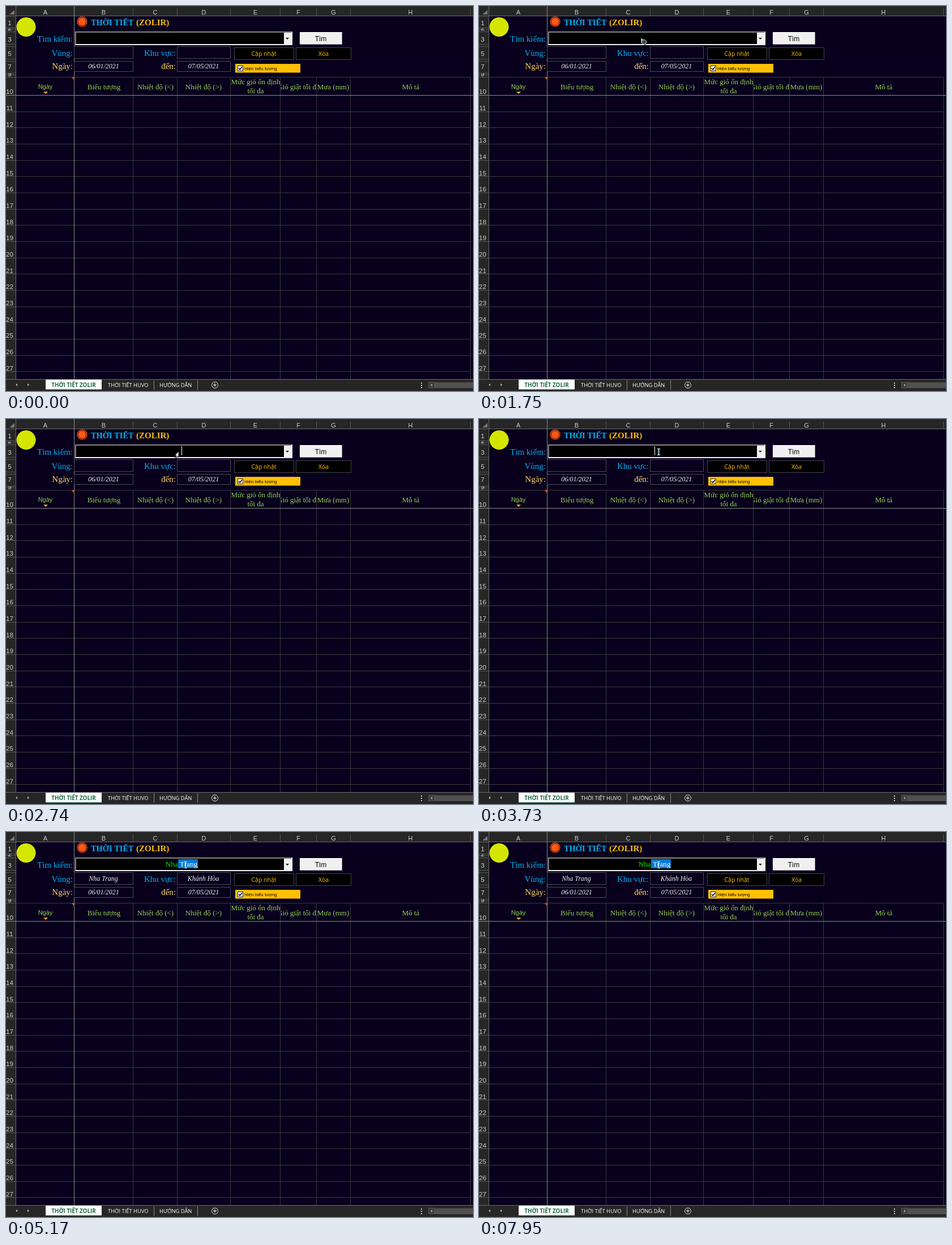
Animation, 825 px wide and 679 px high, one loop 8 s. Source, as an HTML page with a canvas:

```html
<!DOCTYPE html>
<html lang="vi">
<head>
<meta charset="utf-8">
<style>
html, body { margin: 0; width: 100%; height: 100%; overflow: hidden; background: #08001c; }
canvas { display: block; }
</style>
</head>
<body>
<canvas id="stage" width="825" height="679"></canvas>
<script>
const ctx = document.getElementById('stage').getContext('2d');
const LOOP = 8000;
const SERIF = '"Liberation Serif", serif';
const SANS = '"Liberation Sans", sans-serif';
const UI = '"Open Sans", "Noto Sans", sans-serif';
const BLUE = '#00b0f0', GOLD = '#ffc000', PALE = '#ffd966', GREEN = '#92d050';
const BG = '#08001c', CHROME = '#262626', GRID = '#3a3940', FREEZE = '#8c8c8c';
const columns = [18, 120, 224, 302, 396, 484, 548, 608, 820];
const rowPitch = 86 / 3;

function rect(x, y, w, h, color) {
  ctx.fillStyle = color;
  ctx.fillRect(x, y, w, h);
}
function box(x, y, w, h, fill, border) {
  rect(x, y, w, h, border);
  rect(x + 1, y + 1, w - 2, h - 2, fill);
}
// One bevel ring: light or dark on the top left, the other on the bottom right.
function bevel(x, y, w, h, topLeft, bottomRight) {
  rect(x, y, w, 1, topLeft);
  rect(x, y, 1, h, topLeft);
  rect(x, y + h - 1, w, 1, bottomRight);
  rect(x + w - 1, y, 1, h, bottomRight);
}
function text(str, x, y, font, color, align = 'center') {
  ctx.font = font;
  ctx.fillStyle = color;
  ctx.textAlign = align;
  ctx.fillText(str, x, y);
}
function clipped(x, y, w, h, draw) {
  ctx.save();
  ctx.beginPath();
  ctx.rect(x, y, w, h);
  ctx.clip();
  draw();
  ctx.restore();
}
function shape(points, fill, stroke) {
  ctx.beginPath();
  points.forEach(([x, y]) => ctx.lineTo(x, y));
  ctx.closePath();
  ctx.fillStyle = fill;
  ctx.fill();
  if (stroke) {
    ctx.strokeStyle = stroke;
    ctx.lineWidth = 1;
    ctx.stroke();
  }
}
function circle(x, y, r, fill, stroke, width = 1) {
  ctx.beginPath();
  ctx.arc(x, y, r, 0, Math.PI * 2);
  if (fill) { ctx.fillStyle = fill; ctx.fill(); }
  if (stroke) { ctx.strokeStyle = stroke; ctx.lineWidth = width; ctx.stroke(); }
}

function drawGrid() {
  rect(0, 0, 825, 679, BG);
  rect(0, 0, 825, 18, CHROME);
  rect(0, 0, 17, 658, CHROME);
  rect(18, 125, 802, 1, GRID);
  columns.slice(1).forEach(x => {
    rect(x, 4, 1, 14, '#555');
    rect(x, 125, 1, 533, GRID);
  });
  [38, 41, 45, 67, 71, 93, 97, 118, 121, 125].forEach(y => rect(0, y, 17, 1, '#555'));
  for (let i = 1; i < 18; i++) {
    const y = Math.round(157 + i * rowPitch);
    rect(18, y, 802, 1, GRID);
    rect(0, y, 17, 1, '#555');
  }
  rect(0, 17, 825, 1, '#6a6a6a');
  rect(17, 0, 1, 658, '#6a6a6a');
  rect(0, 157, 825, 1, FREEZE);
  rect(120, 0, 1, 658, FREEZE);

  shape([[15, 7], [15, 15], [6, 15]], '#777');
  [...'ABCDEFGH'].forEach((letter, i) =>
    text(letter, (columns[i] + columns[i + 1]) / 2 + 0.5, 15, '11px ' + SANS, '#d0d0d0'));
  const label = (n, y) => text(n, 6.5, y, '11.5px ' + SANS, '#d0d0d0');
  [[1, 34], [3, 63], [5, 88], [7, 111], [10, 155]].forEach(([n, y]) => label(n, y));
  clipped(0, 39, 17, 6, () => label(2, 43));
  clipped(0, 119, 17, 6, () => label(9, 124));
  for (let n = 11; n < 28; n++) label(n, Math.round(184 + (n - 11) * rowPitch));
}

function drawSun(x, y) {
  const rays = Array.from({ length: 32 }, (_, i) => {
    const a = i * Math.PI / 16, r = i % 2 ? 8 : 10;
    return [x + r * Math.cos(a), y + r * Math.sin(a)];
  });
  shape(rays, '#f04a12');
  circle(x, y, 7, '#ff5a14', '#5a1a10');
}

function drawForm() {
  circle(35.5, 37, 17, '#d4e600');
  drawSun(134.5, 27.5);
  text('THỜI TIẾT', 150, 34, 'bold 14.4px ' + SERIF, BLUE, 'left');
  text('(ZOLIR)', 230, 34, 'bold 15px ' + SERIF, GOLD, 'left');
  [['Tìm kiếm:', 118, 63, BLUE], ['Vùng:', 118, 88, BLUE], ['Khu vực:', 300, 88, BLUE],
   ['Ngày:', 118, 111, PALE], ['đến:', 300, 111, PALE]]
    .forEach(([s, x, y, color]) => text(s, x, y, '15px ' + SERIF, color, 'right'));

  [[120, 105], [302, 95]].forEach(([x, w]) => {
    box(x, 71, w, 22, BG, '#4b4a52');
    box(x, 97, w, 19, BG, '#4b4a52');
  });
  text('06/01/2021', 172.5, 110, 'italic 12px ' + SERIF, '#f2f2f2');
  text('07/05/2021', 349, 110, 'italic 12px ' + SERIF, '#f2f2f2');

  rect(122, 45, 384, 24, '#000');
  bevel(122, 45, 384, 24, '#a0a0a0', '#fff');
  bevel(123, 46, 382, 22, '#696969', '#e3e3e3');
  rect(491, 47, 13, 20, '#f0f0f0');
  shape([[494, 56], [500, 56], [497, 59]], '#000');

  rect(519, 46, 75, 22, '#f0f0f0');
  bevel(519, 46, 75, 22, '#fff', '#a0a0a0');
  text('Tìm', 556, 62, '12px ' + SANS, '#000');

  box(403, 73, 106, 22, '#000', '#44434a');
  box(512, 73, 98, 22, '#000', '#44434a');
  text('Cập nhật', 455.5, 88, '10.5px ' + UI, GOLD);
  text('Xóa', 561, 88, '10.5px ' + UI, GOLD);
  rect(405, 102, 115, 15.5, GOLD);
  box(409, 105, 10, 10, '#fff', '#222');
  ctx.beginPath();
  ctx.moveTo(411, 110);
  ctx.lineTo(413, 112);
  ctx.lineTo(417, 107.5);
  ctx.strokeStyle = '#000';
  ctx.lineWidth = 1.6;
  ctx.stroke();
  text('Hiện biểu tượng', 421, 113, '8px ' + SANS, '#000', 'left');
}

function drawTableHeader() {
  const font = '13px ' + SERIF;
  text('Ngày', 69.5, 146, '11px ' + SANS, GREEN);
  shape([[66, 151], [74, 151], [70, 155]], '#ffa51f');
  shape([[115.5, 125.5], [120.5, 125.5], [120.5, 130.5]], '#e2571e');
  [['Biểu tượng', 173, 147], ['Nhiệt độ (<)', 264, 147], ['Nhiệt độ (>)', 349, 147],
   ['Mức gió ổn định', 441, 138], ['tối đa', 441, 154], ['Mưa (mm)', 578, 147], ['Mô tả', 715, 147]]
    .forEach(([s, x, y]) => text(s, x, y, font, GREEN));
  clipped(485, 126, 63, 31, () => text('Gió giật tối đa', 516.5, 147, font, GREEN));
}

function drawTabs() {
  rect(0, 658, 825, 21, CHROME);
  rect(0, 658, 825, 1, '#6a6a6a');
  shape([[20, 665.5], [20, 670.5], [17, 668]], '#b5b5b5');
  shape([[38, 665.5], [38, 670.5], [41, 668]], '#b5b5b5');
  rect(70, 659, 99, 17, '#fff');
  rect(70, 676, 99, 1, '#217346');
  text('THỜI TIẾT ZOLIR', 119.5, 672, 'bold 9.8px ' + UI, '#1c6a43');
  text('THỜI TIẾT HUVO', 180, 672, '9.4px ' + UI, '#fff', 'left');
  text('HƯỚNG DẪN', 271, 672, '9.4px ' + UI, '#fff', 'left');
  [261, 338].forEach(x => rect(x, 660, 1, 17, '#8a8a8a'));
  circle(369, 668.5, 5.5, null, '#ddd');
  rect(366, 668, 6, 1, '#fff');
  rect(368.5, 665.5, 1, 6, '#fff');
  [664, 668, 672].forEach(y => rect(733, y, 2, 2, '#c8c8c8'));
  rect(746, 663, 79, 11, '#333');
  box(746, 663, 11, 11, '#3c3c3c', '#555');
  shape([[753, 666], [753, 671], [750, 668.5]], '#aaa');
  rect(757, 664, 68, 10, '#505050');
}

function drawEntry(t) {
  if (t < 4080) {
    if ((t >= 2630 && t < 3160) || t >= 3690) rect(310, 48, 1, 16, '#fff');
    return;
  }
  const name = 'Nha Trang';
  const typed = t < 4300 ? 1 : t < 4510 ? 2 : 3;
  ctx.font = '13.33px ' + SERIF;
  const full = ctx.measureText(name).width;
  const left = 310 - full / 2;
  const split = left + ctx.measureText(name.slice(0, typed)).width;
  rect(Math.round(split), 48, Math.round(left + full - split), 16, '#0078d7');
  text(name.slice(0, typed), left, 60.5, ctx.font, '#00f000', 'left');
  text(name.slice(typed), split, 60.5, ctx.font, '#fff', 'left');
  text('Nha Trang', 172, 86, 'italic 12px ' + SERIF, '#f2f2f2');
  text('Khánh Hòa', 348.5, 86, 'italic 12px ' + SERIF, '#f2f2f2');
}

// Pointer tip: time, x, y
const path = [
  [310, 776, 662], [530, 640, 500], [750, 320, 215], [860, 220, 125], [970, 179, 91],
  [1090, 180, 91], [1300, 205, 84], [1520, 262, 66], [1750, 287, 56], [1970, 279, 56],
  [2200, 290, 57], [2400, 305, 57], [2950, 305, 57], [3190, 317, 58], [LOOP, 317, 58]
];
function pointerAt(t) {
  const next = path.findIndex(p => p[0] > t);
  const [t0, x0, y0] = path[next - 1], [t1, x1, y1] = path[next];
  const k = (t - t0) / (t1 - t0);
  return [Math.round(x0 + (x1 - x0) * k), Math.round(y0 + (y1 - y0) * k)];
}

const leftArrow = [[0, 0], [0, 10], [2.5, 8], [6.5, 13], [8.5, 11.5], [5, 7], [8.5, 6]];
const rightArrow = [[0, 0], [0, 11], [-2.5, 8.5], [-4.5, 13], [-6, 12], [-4, 7.5], [-7, 7.5]];
function drawArrow(x, y, outline, fill) {
  shape(outline.map(([dx, dy]) => [x + dx, y + dy]), fill, '#111');
}

function drawBeam(t, x, y) {
  const phase = t < 4830 ? 3 : Math.min(3, Math.floor(((t - 4830) % 556) / 112));
  const color = ['#b9e6ee', '#8fcfdc', '#b9e6ee', '#e4f8fb'][phase];
  if (t < 4080) rect(x - 2, y - 6, 5, 12, '#0b4f5c');
  rect(x, y - 6, 1, 12, color);
  rect(x - 2, y - 6, 5, 1, color);
  rect(x - 2, y + 5, 5, 1, color);
}

function drawPointer(t) {
  if (t < 310) return;
  // The pointer advances in 110 ms steps.
  const [x, y] = pointerAt(310 + Math.floor((t - 310) / 110) * 110);
  if (t >= 2950) return drawBeam(t, x, y);
  if (t >= 2200) return drawArrow(x, y, rightArrow, '#fff');
  drawArrow(x, y, leftArrow, '#e4e4e4');
  if (t >= 1640) circle(x + 5.5, y + 7.5, 4, '#3c464c', '#a9b9bf', 1.2);
}

function frame(now) {
  const t = now % LOOP;
  drawGrid();
  drawForm();
  drawTableHeader();
  drawTabs();
  drawEntry(t);
  drawPointer(t);
  requestAnimationFrame(frame);
}
requestAnimationFrame(frame);
</script>
</body>
</html>
```
